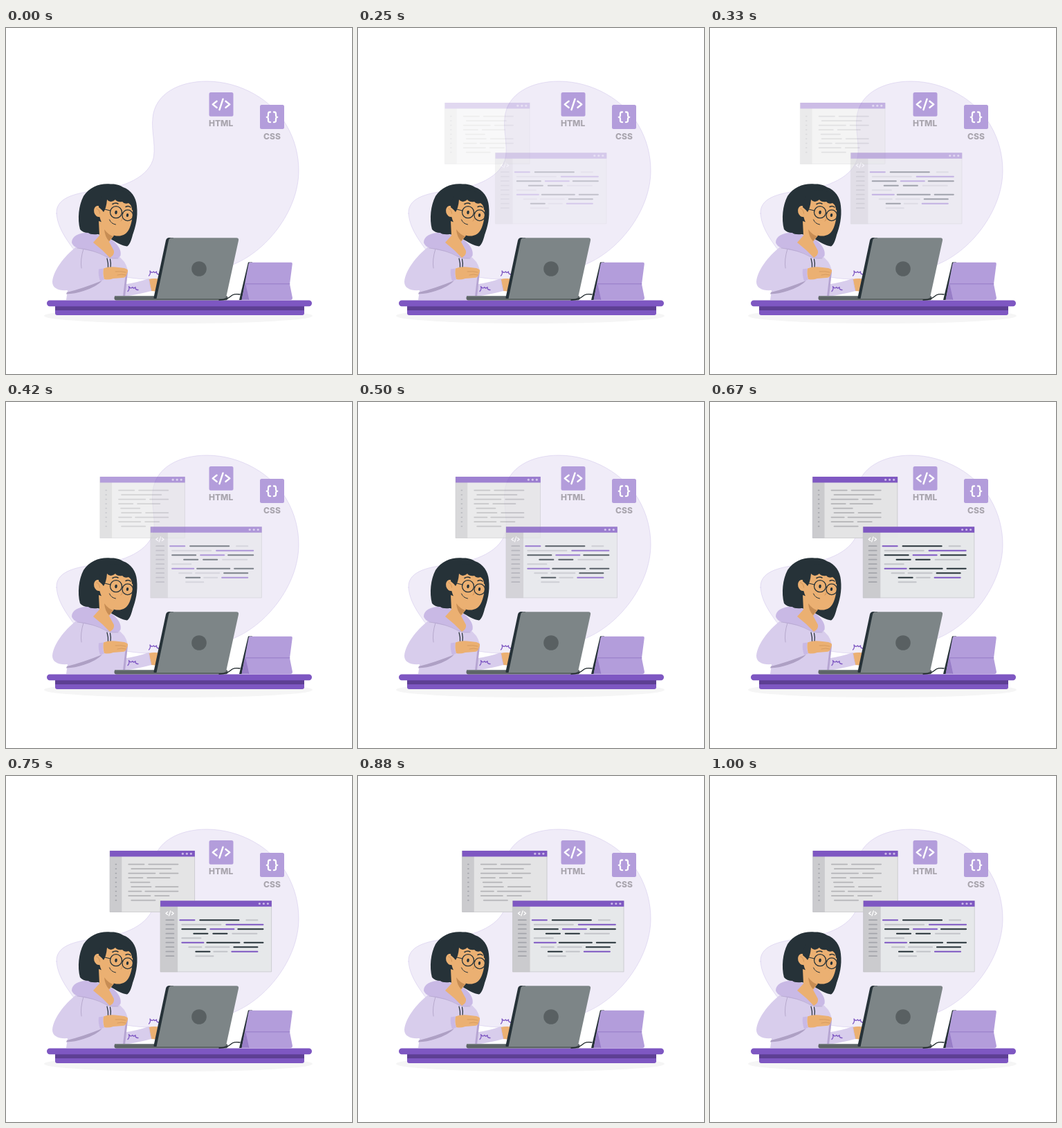
These frames come from a looping animation (500x500 px, 1.04 s). An HTML page with a canvas:

```html
<!DOCTYPE html>
<html lang="en">
<head>
<meta charset="utf-8">
<title>Coding at a desk</title>
<style>
html, body { margin: 0; width: 100%; height: 100%; overflow: hidden; background: #fff; }
canvas { display: block; width: 500px; height: 500px; }
</style>
</head>
<body>
<canvas id="stage"></canvas>
<script>
const SIZE = 500, LOOP = 1040, FPS = 24, LAST = 24, SLIDE = 30;
const PURPLE = '#7e57c2', LILAC = '#b39ddb', DARK = '#263238', SKIN = '#ebb072';
const SHIRT = '#d8cdec', HOOD = '#c9b9e5', MAUVE = '#aea0c4', PALE = '#c2c4c9';

const dpr = window.devicePixelRatio || 1;
const stage = document.getElementById('stage');

function prepare(canvas) {
  canvas.width = canvas.height = SIZE * dpr;
  const c = canvas.getContext('2d');
  c.scale(dpr, dpr);
  c.lineCap = c.lineJoin = 'round';
  return c;
}
const ctx = prepare(stage);
const scene = prepare(document.createElement('canvas'));
const layer = prepare(document.createElement('canvas'));

function fill(c, color, d) {
  c.fillStyle = color;
  c.fill(new Path2D(d));
}
function line(c, color, width, d) {
  c.strokeStyle = color;
  c.lineWidth = width;
  c.stroke(new Path2D(d));
}
function box(c, color, x, y, w, h, r = 0) {
  c.fillStyle = color;
  c.beginPath();
  c.roundRect(x, y, w, h, r);
  c.fill();
}
function oval(c, color, x, y, rx, ry = rx, turn = 0) {
  c.fillStyle = color;
  c.beginPath();
  c.ellipse(x, y, rx, ry, turn, 0, Math.PI * 2);
  c.fill();
}
function ring(c, color, width, x, y, r) {
  c.strokeStyle = color;
  c.lineWidth = width;
  c.beginPath();
  c.arc(x, y, r, 0, Math.PI * 2);
  c.stroke();
}
function tag(c, x, y, s, width) {
  c.save();
  c.translate(x, y);
  c.scale(s, s);
  line(c, '#fff', width, 'M-6.3-4.5L-12 0L-6.3 4.5M2.5-7.6L-2.5 7.6M6.3-4.5L12 0L6.3 4.5');
  c.restore();
}
function label(c, text, x, y) {
  c.font = '800 12px Inter, "Open Sans", sans-serif';
  c.textAlign = 'center';
  c.fillStyle = '#a9a5ae';
  c.fillText(text, x, y);
}

function drawBackdrop(c) {
  const blob = 'M73 268C72 246 97 239 130 235C170 231 208 215 213.5 186' +
    'C216 165 210 150 212 130C215 95 250 77 290 77C340 77 385 105 405 140' +
    'C418 162 423 185 423 206C423 265 375 325 325 343C290 356 240 364 205 363' +
    'C150 362 110 340 92 312C80 295 74 282 73 268Z';
  fill(c, '#f0ecf8', blob);
  line(c, '#cdc0e8', 0.5, blob);
  oval(c, '#f5f5f5', 249, 416, 194, 11);
}

function drawIcons(c) {
  box(c, LILAC, 293.5, 93, 35, 34.7, 2.5);
  tag(c, 311, 110.4, 1.02, 2.4);
  label(c, 'HTML', 310.6, 142);
  box(c, LILAC, 367, 111, 35, 35, 2.5);
  line(c, '#fff', 2.3, 'M382 121.5C378.6 121.3 379 123.3 379 125.5C379 127.8 378.8 128.8 376.8 128.8' +
    'C378.8 128.8 379 129.8 379 132C379 134.3 378.6 136.3 382 136.1' +
    'M387 121.5C390.4 121.3 390 123.3 390 125.5C390 127.8 390.2 128.8 392.2 128.8' +
    'C390.2 128.8 390 129.8 390 132C390 134.3 390.4 136.3 387 136.1');
  label(c, 'CSS', 384.5, 160.5);
}

function drawBody(c) {
  // far arm
  fill(c, SHIRT, 'M168 371Q190 368 206 362L210 380Q192 385 170 388Z');
  fill(c, SKIN, 'M206.5 363Q214 361 223 363V381L210 380Z');
  line(c, HOOD, 0.8, 'M206.5 363Q208 372 210 380');
  // torso and near arm
  fill(c, SHIRT, 'M103 315Q130 326 160 328Q173 336 176 350L171 393H87L89 379' +
    'C76 380 67 376 67 367C68 352 82 331 103 315Z');
  fill(c, MAUVE, 'M88 382Q112 376 139 365Q131 374 112 380Q100 384 87 384.5Z');
  line(c, MAUVE, 0.8, 'M112 319Q107 335 109 347');
  fill(c, '#b6a5d2', 'M173 354L176 352L172 388L169 388Z');
  fill(c, HOOD, 'M134 348.5L141 347.5Q138.5 355 142 363.5L136 365.5Q133 357 134 348.5Z');
  // hood
  fill(c, HOOD, 'M95 310C95 301 105 296 118 295.5L138 300L154 307C163 314 167 322 165.5 329' +
    'C162 335 154 333 146 331C134 322 116 322 104 318Q96 315 95 310Z');
  line(c, MAUVE, 0.6, 'M103 318Q126 320 146 331Q154 334 162 333');
  line(c, DARK, 1.2, 'M146 333Q148 340 147.5 346M150.5 334Q152 340 151 347');
  // near hand
  fill(c, SKIN, 'M141 347.5Q148 344.5 158 345.5L171 347Q177 348.5 176 352L174 357' +
    'Q173 361 168 361L155 362Q148 364.5 142 363Q139.5 355 141 347.5Z');
  line(c, '#c88e54', 0.6, 'M158 352Q166 351 173 353M161 357Q167 355 173 357');
}

function drawHead(c) {
  fill(c, DARK, 'M107 291C103 276 105 256 112 243C121 229 137 224 151 225.5' +
    'C160 225 166 228 169 230C181 234 188 245 189 257C191 274 187 288 183 299' +
    'C181 307 179 313 175 315.5C168 315 158 309 150 304L133 298Q122 299 119 296Q111 296 107 291Z');
  fill(c, SKIN, 'M134 279L135 300L126 310Q139 320 150 332Q157 328 156 322L149 309L156 300L146 283Z');
  fill(c, '#c78d54', 'M142 291Q148 299 155 301Q151 305 149 308Q143 302 142 291Z');
  oval(c, SKIN, 133.5, 265, 6.4, 8.2, -0.25);
  fill(c, SKIN, 'M135 272L140 263L144 246L163 243L181 251C185 262 183 278 179 288' +
    'C175 299 166 302 157 300C147 297 139 287 135 272Z');
  // fringe
  fill(c, DARK, 'M134 259Q139 263 141 266Q145 260 146 248Q151 254 158 248' +
    'Q161 252 168 251Q171 255 177 253Q182 256 182 263L187 262Q184 235 155 234Q135 237 134 259Z');
  line(c, '#c88e54', 0.8, 'M131 261Q135 262 135.5 268');
  // features
  line(c, DARK, 1.5, 'M154 254.5Q158 252 162 254M173 258.5Q177 256.5 180 259');
  oval(c, DARK, 159, 266.5, 1.8, 2.7, 0.15);
  oval(c, DARK, 175.5, 270.5, 1.7, 2.6, 0.15);
  line(c, '#ca8850', 0.9, 'M168 272Q169 277 166 279');
  line(c, DARK, 1, 'M149.5 277Q152 283 158.5 284');
  ring(c, DARK, 1.25, 159, 266.2, 8.5);
  ring(c, DARK, 1.25, 175.8, 270.7, 7.8);
  line(c, DARK, 1.25, 'M139 261L150.8 264M167.5 267.5Q168.5 267.2 168.9 268');
}

function spark(c, x, y) {
  line(c, PURPLE, 1.3, `M${x} ${y + 5}Q${x + 3} ${y + 2} ${x + 1.5} ${y - 2}` +
    `Q${x + 4} ${y + 2} ${x + 7} ${y - 1}Q${x + 8} ${y + 2} ${x + 11} ${y - 1}` +
    `Q${x + 10.5} ${y + 3} ${x + 15} ${y + 3}`);
}

function drawDesk(c) {
  box(c, PURPLE, 71, 400, 360, 15, 3);
  box(c, '#5d3f93', 71, 402, 360, 6);
  box(c, PURPLE, 59, 393.5, 383, 8.7, 4.2);
  // laptop
  box(c, '#5d6466', 156.5, 387, 164, 6.5, 3);
  box(c, '#7d8587', 157, 387, 58, 1.2, 0.5);
  fill(c, DARK, 'M236 303H242L222 391H214Q213 390 214 387L231 307Q232 303 236 303Z');
  fill(c, '#7d8587', 'M239 303.3H333Q336.7 303.3 336 307L318.5 387Q317.5 391 313.5 391H217.5L235 307Q236 303.3 239 303.3Z');
  oval(c, '#596062', 279, 348, 10.8);
  // tablet
  line(c, '#1c2529', 1.3, 'M308 393C320 393 323 389 327 386Q331 384 338 385');
  fill(c, DARK, 'M350 338.5H356L345 393H337Z');
  fill(c, LILAC, 'M353 338.7H412Q414 338.7 413.8 341L410 370L414 390Q414 393 411 393H340.5L350.5 341Q351 338.7 353 338.7Z');
  fill(c, '#987fc6', 'M345.5 370L350.5 392.5H340.7Z');
  line(c, '#8f72c3', 0.8, 'M345.5 369.8H410M346 371L350.7 392.5');
}

// each row: start, end, tone, repeated
const frontRows = [
  [249, 272, 'p', 278, 336, 'd', 345, 363, 'l'],
  [252, 310, 'l', 316, 371, 'p'],
  [252, 288, 'd', 293, 329, 'p', 333, 371, 'd'],
  [269, 291, 'd', 297, 319, 'd', 325, 362, 'l'],
  [252, 281, 'l'],
  [252, 285, 'p', 288, 337, 'd', 342, 371, 'd'],
  [262, 282, 'l', 286, 322, 'l', 327, 363, 'd'],
  [272, 294, 'd', 298, 319, 'l', 324, 363, 'p'],
  [272, 299, 'l']
];
const backRows = [
  [175, 199, 'g', 204, 248, 'g'],
  [179, 238, 'g'],
  [175, 215, 'g', 220, 248, 'g'],
  [175, 197, 'g', 202, 236, 'g'],
  [178, 207, 'g'],
  [179, 209, 'g', 214, 248, 'g'],
  [175, 195, 'g', 199, 248, 'g'],
  [175, 208, 'g', 213, 235, 'g'],
  [179, 215, 'g']
];
const tones = { p: PURPLE, d: DARK, l: PALE, g: '#b4b4b7' };

function drawPanel(c, p) {
  box(c, p.body, p.x, p.y, p.w, p.h);
  box(c, '#cbcbce', p.x, p.y, p.side, p.h);
  c.strokeStyle = '#bcbcc2';
  c.lineWidth = 0.6;
  c.strokeRect(p.x + 0.3, p.y + 0.3, p.w - 0.6, p.h - 0.6);
  box(c, PURPLE, p.x, p.y, p.w, 8.5);
  for (let i = 0; i < 3; i++) oval(c, '#cbbae8', p.x + p.w - 17.5 + i * 6, p.y + 4.3, 1.6);
  p.rows.forEach((row, i) => {
    const y = p.first + i * 6.5;
    line(c, '#a4a5ab', 1.8, `M${p.mark[0]} ${y}H${p.mark[1]}`);
    for (let j = 0; j < row.length; j += 3)
      line(c, tones[row[j + 2]], 1.9, `M${row[j] + 0.9} ${y}H${row[j + 1] - 0.9}`);
  });
}
const back = { x: 148.7, y: 108, w: 122.8, h: 88.7, side: 17.2, body: '#e4e4e5',
  first: 127.6, mark: [157.1, 157.9], rows: backRows };
const front = { x: 221.7, y: 180.2, w: 160.8, h: 103, side: 25, body: '#e6e8ea',
  first: 208.2, mark: [230, 241], rows: frontRows };

// cubic-bezier(.36, -.01, .5, 1.38)
function ease(x) {
  const curve = (s, a, b) => 3 * (1 - s) * (1 - s) * s * a + 3 * (1 - s) * s * s * b + s * s * s;
  let lo = 0, hi = 1;
  for (let i = 0; i < 30; i++) {
    const mid = (lo + hi) / 2;
    if (curve(mid, 0.36, 0.5) < x) lo = mid; else hi = mid;
  }
  return curve(hi, -0.01, 1.38);
}

function slideIn(panel, progress) {
  layer.clearRect(0, 0, SIZE, SIZE);
  layer.save();
  layer.translate((progress - 1) * SLIDE, 0);
  drawPanel(layer, panel);
  if (panel === front) tag(layer, 235.2, 198.4, 0.47, 2.6);
  layer.restore();
  ctx.globalAlpha = Math.min(1, Math.max(0, progress));
  ctx.drawImage(layer.canvas, 0, 0, SIZE, SIZE);
  ctx.globalAlpha = 1;
}

// steps fall on hundredths of a second
function stepAt(ms) {
  let k = LAST;
  while (k > 0 && Math.round(k * 100 / FPS) * 10 > ms) k--;
  return k;
}

function buildScene() {
  drawIcons(scene);
  drawBody(scene);
  drawHead(scene);
  spark(scene, 206.5, 353);
  spark(scene, 176, 375.5);
  drawDesk(scene);
}

function render(ms) {
  const k = stepAt(ms);
  const progress = k < 2 ? 0 : ease(k / FPS);
  ctx.fillStyle = '#fff';
  ctx.fillRect(0, 0, SIZE, SIZE);
  drawBackdrop(ctx);
  slideIn(back, progress);
  slideIn(front, progress);
  ctx.drawImage(scene.canvas, 0, 0, SIZE, SIZE);
}

buildScene();
render(0);
const start = performance.now();
function tick() {
  render((performance.now() - start) % LOOP);
  requestAnimationFrame(tick);
}
requestAnimationFrame(tick);
</script>
</body>
</html>
```
